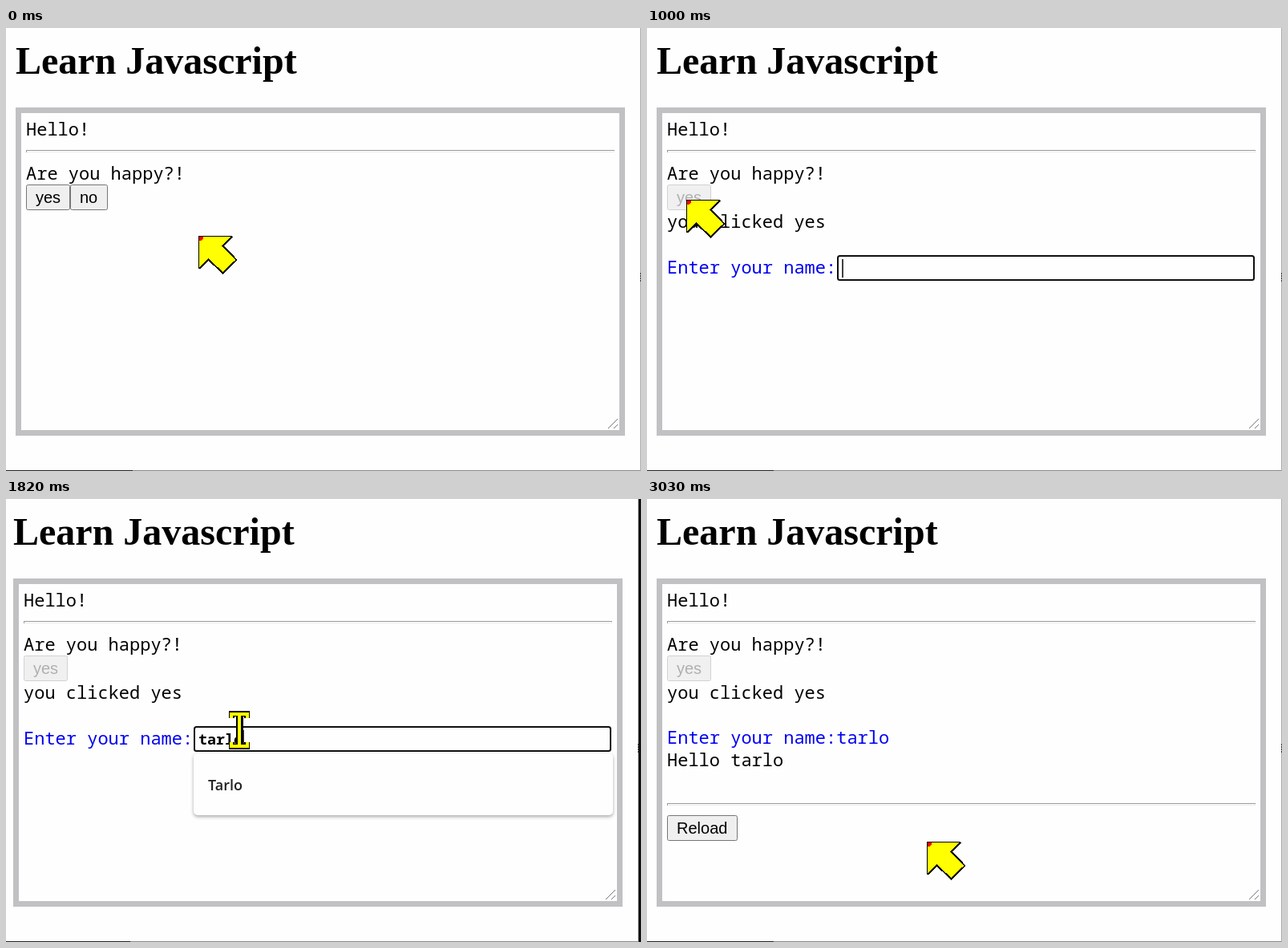
Recreate the animation shown at these times as an HTML page. Size 792 by 552 pixels, loop 5200 ms.

```html
<!DOCTYPE html>
<html lang="en">
<head>
<meta charset="utf-8">
<title>Learn Javascript</title>
<style>
html, body { margin: 0; width: 100%; height: 100%; overflow: hidden; background: #fefefe; }
svg { display: block; }
.mono { font: 22px "Noto Sans Mono", monospace; }
.typed { font: bold 18.33px "Noto Sans Mono", monospace; }
.button text { font: 20px "Liberation Sans", Arial, sans-serif; }
.button rect { fill: #efefef; stroke: #767676; }
.button.hover rect { fill: #e5e5e5; stroke: #4f4f4f; }
.button.active rect { fill: #f5f5f5; stroke: #8d8d8d; }
.button.disabled rect { fill: #f0f0f0; stroke: #d2d2d2; }
.button.disabled text { fill: #b0b0b0; }
.blue { fill: #0000f0; }
#popup rect { fill: #fefefe; filter: drop-shadow(0 2px 2px #0005); }
#popup text { font: 600 18px "Open Sans", sans-serif; fill: #202124; }
</style>
</head>
<body>
<svg width="792" height="552" viewBox="0 0 792 552">
  <defs>
    <g id="rule">
      <path d="M25 .5H759M25.5 0V3" stroke="#9a9a9a"/>
      <path d="M26 2.5H759M758.5 1V3" stroke="#ececec"/>
    </g>
  </defs>
  <g id="page">
    <text x="12" y="57" font-family="Liberation Serif, Times, serif" font-size="48" font-weight="bold">Learn Javascript</text>
    <rect x="15.5" y="102.5" width="753" height="402" fill="none" stroke="#c1c1c4" stroke-width="7"/>
    <path d="M751 499L763 487M758 499L763 494" stroke="#777"/>
    <path d="M158 551.5H795" stroke="#888"/>
    <path d="M0 551.5H158" stroke="#222"/>
    <path d="M791.5 0V552" stroke="#aaa"/>
    <path d="M791.5 305V316" stroke="#333" stroke-dasharray="2 1"/>
    <path d="M794 0V552" stroke="#111" stroke-width="4"/>

    <text class="mono" x="25" y="134">Hello!</text>
    <use href="#rule" y="152"/>
    <text class="mono" x="25" y="189">Are you happy?!</text>
    <g class="button" id="yes">
      <rect x="25.5" y="195.5" width="54" height="31" rx="2"/><text x="37" y="218">yes</text>
    </g>
    <g class="button" id="no">
      <rect x="80.5" y="195.5" width="46" height="31" rx="2"/><text x="92" y="218">no</text>
    </g>

    <text class="mono" id="clicked" x="25" y="249">you clicked yes</text>
    <g id="form">
      <text class="mono blue" x="25" y="306">Enter your name:</text>
      <rect x="238" y="284" width="519" height="30" rx="2.5" fill="#fefefe" stroke="#101010" stroke-width="2"/>
      <text class="typed" id="typed" x="243" y="306"></text>
      <path id="caret" d="M0 288V311" stroke="#000" stroke-width="1.5"/>
    </g>
    <g id="popup">
      <rect x="237" y="317" width="523" height="77" rx="5"/><text x="255" y="363">Tarlo</text>
    </g>
    <g id="result">
      <text class="mono blue" x="25" y="305">Enter your name:tarlo</text>
      <text class="mono" x="25" y="333">Hello tarlo</text>
      <use href="#rule" y="379"/>
      <g class="button">
        <rect x="25.5" y="394.5" width="87" height="31" rx="2"/><text x="37" y="417">Reload</text>
      </g>
    </g>
  </g>

  <g id="arrow" shape-rendering="crispEdges">
    <path d="M.5 .5H42L30.5 12.5L48 30.5L30.5 47L12.5 29.5L.5 41Z" fill="#ff0"/>
    <path d="M0 1H6V3L3 6H0Z" fill="#f00"/>
    <path d="M42 1L30.5 12.5L47.5 30L30.5 46.5L12.5 29.5L1 41" fill="none" stroke="#000" stroke-width="2"/>
    <path d="M.5 41V.5H42" fill="none" stroke="#000"/>
  </g>
  <g id="beam" fill="none" shape-rendering="crispEdges">
    <path d="M0 -21V21" stroke="#000" stroke-width="9"/>
    <path d="M-9.5 -15V-20.5H9.5V-15M-9.5 15V20.5H9.5V15" stroke="#000" stroke-width="7"/>
    <path d="M-10 -15V-20H10V-15M0 -20V20M-10 15V20H10V15" stroke="#ff0" stroke-width="4"/>
  </g>
</svg>
<script>
const LOOP = 5200;
const el = id => document.getElementById(id);
const show = (id, on) => el(id).style.display = on ? "" : "none";
const move = (id, x, y) => el(id).setAttribute("transform", `translate(${x} ${y})`);

// Pointer hotspot: time, x, y
const path = [
  [30, 240, 259], [480, 51, 219], [550, 49, 214], [1000, 49, 214],
  [1240, 275, 278], [1270, 291, 288], [2860, 291, 288],
  [2895, 268, 300], [2940, 286, 340], [3030, 349, 427]
];
const keys = [1440, 1480, 1720, 1770, 1820];

function pointer(t) {
  const i = path.findIndex(p => p[0] > t);
  if (i === 0) return path[0].slice(1);
  if (i < 0) return path[path.length - 1].slice(1);
  const a = path[i - 1], b = path[i];
  let k = (t - a[0]) / (b[0] - a[0]);
  if (b[0] - a[0] > 200) k = k * k * (3 - 2 * k);
  return [1, 2].map(n => Math.round(a[n] + (b[n] - a[n]) * k));
}

function draw(t) {
  const [x, y] = pointer(t);
  const clicked = t >= 770, done = t >= 2550;
  const over = (left, right) => x >= left && x < right && y >= 195 && y < 227;

  move("page", t >= 1270 && !done ? -3 : 0, 0);
  el("yes").setAttribute("class", "button " +
    (clicked ? "disabled" : t >= 720 ? "active" : over(25, 80) ? "hover" : ""));
  el("no").setAttribute("class", "button " + (over(80, 127) ? "hover" : ""));
  show("no", !clicked);
  show("clicked", clicked);
  show("form", clicked && !done);
  show("popup", t >= 1480 && t < 2510);
  show("result", done);

  const count = keys.filter(k => t >= k).length;
  el("typed").textContent = "tarlo".slice(0, count);
  move("caret", 244 + count * 11, 0);

  const beam = t >= 1270 && t < 2940 && y < 312;
  show("beam", beam);
  show("arrow", !beam);
  move(beam ? "beam" : "arrow", x, y);
}

function tick() {
  draw(performance.now() % LOOP);
  requestAnimationFrame(tick);
}
tick();
</script>
</body>
</html>
```
